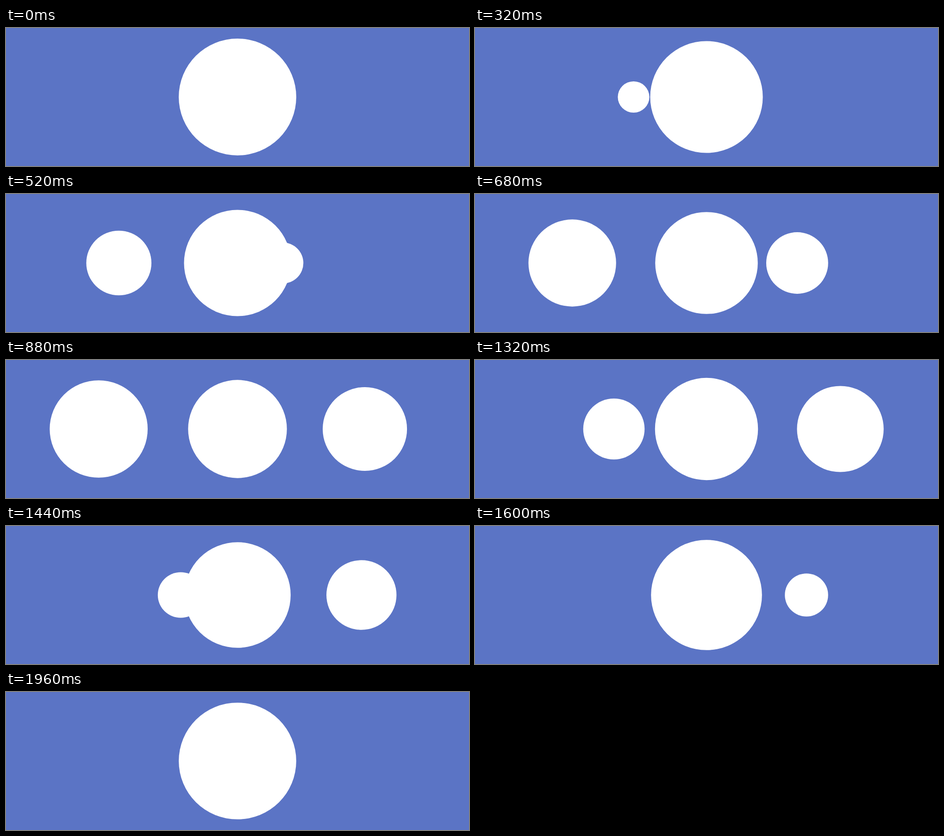
An HTML page that plays this animation: 1000 px wide and 300 px high, repeating every 2 s.

```html
<!DOCTYPE html>
<html lang="en">
<head>
<meta charset="utf-8">
<title>Three dots</title>
<style>
  html, body { margin: 0; width: 100%; height: 100%; overflow: hidden; background: #5b74c5; }
  svg { display: block; width: 100%; height: 100%; fill: #fff; }
</style>
</head>
<body>
<svg viewBox="0 0 1000 300">
  <circle id="left" cy="150"/>
  <circle id="middle" cx="500" cy="150"/>
  <circle id="right" cy="150"/>
</svg>
<script>
const LOOP = 2000, STEP = 40;
const RADIUS = 106, REACH = 300;
const THIRD = 1 / 3;

// Ease with zero speed at both ends; the influences say how long each end lingers.
function ease(x, startInfluence = THIRD, endInfluence = THIRD) {
  if (x <= 0) return 0;
  if (x >= 1) return 1;
  let low = 0, high = 1, u;
  for (let i = 0; i < 24; i++) {
    u = (low + high) / 2;
    const v = 1 - u;
    const at = 3 * startInfluence * u * v * v + 3 * (1 - endInfluence) * u * u * v + u ** 3;
    if (at < x) low = u; else high = u;
  }
  return u * u * (3 - 2 * u);
}

// Goes from 0 to 1 during the rise and back to 0 during the fall.
function pulse(t, { rise, fall }, riseInfluence = [], fallInfluence = []) {
  const along = ([from, to]) => (t - from) / (to - from);
  return ease(along(rise), ...riseInfluence) * (1 - ease(along(fall), ...fallInfluence));
}

const sides = [
  {
    dot: document.getElementById("left"), direction: -1,
    times: { rise: [-6, 855], fall: [852, 1978] },
    travel: [[THIRD, 0.69], [0.58, 0.62]]
  },
  {
    dot: document.getElementById("right"), direction: 1,
    times: { rise: [10, 1149], fall: [1137, 1995] },
    travel: [[0.625, 0.56], [0.678, 0.174]]
  }
];
const middle = document.getElementById("middle");
const middleTimes = { rise: [-9, 991], fall: [991, 1991] };

function draw(now) {
  const t = Math.floor((now % LOOP) / STEP) * STEP;
  middle.setAttribute("r", 126.9 - 20.95 * pulse(t, middleTimes));
  for (const { dot, direction, times, travel } of sides) {
    dot.setAttribute("cx", 500 + direction * REACH * pulse(t, times, ...travel));
    dot.setAttribute("r", RADIUS * pulse(t, times));
  }
}

let start;
function tick(now) {
  start ??= now;
  draw(now - start);
  requestAnimationFrame(tick);
}
draw(0);
requestAnimationFrame(tick);
</script>
</body>
</html>
```
